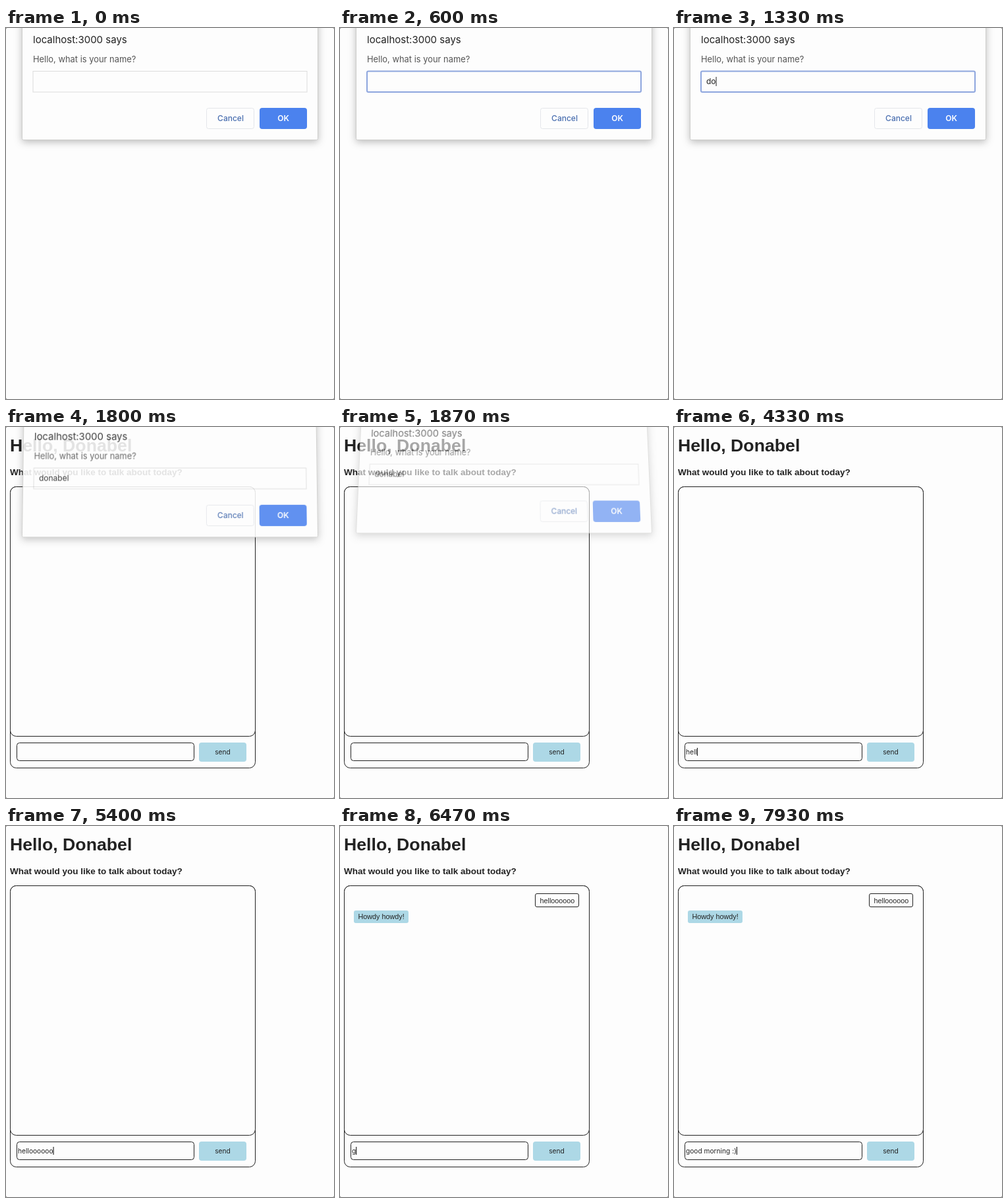
These frames come from a looping animation (498 px wide and 562 px high, 8 s). An HTML page:

```html
<!DOCTYPE html>
<html lang="en">
<head>
<meta charset="utf-8">
<title>Chat prompt</title>
<style>
  html, body { margin: 0; width: 100%; height: 100%; overflow: hidden; background: #777; }
  svg { position: absolute; left: 0; top: 0; }
  text { white-space: pre; fill: #222; font-family: "Liberation Sans", Arial, sans-serif; }
  .ui { font-family: Inter, sans-serif; }
  .line { fill: #fdfdfd; stroke: #222; }
  .tint { fill: #add8e6; }
  .mid { text-anchor: middle; }
  #dialog { overflow: visible; transform-origin: 249px 169px; }
  #sheet { fill: #fdfdfd; stroke: #cdcdcb; filter: drop-shadow(0 3px 6px rgba(0, 0, 0, .26)); }
  #dialog .button { font-size: 12px; font-weight: 500; }
</style>
</head>
<body>
<svg width="498" height="562">
  <rect width="498" height="562" rx="2" fill="#fdfdfd"/>
  <g id="page">
    <text x="6" y="37" font-size="26.7" font-weight="bold">Hello, Donabel</text>
    <text x="6" y="73" font-size="13.5" font-weight="bold">What would you like to talk about today?</text>
    <rect class="line" x="6.5" y="90.5" width="372" height="426" rx="9"/>
    <rect class="line" x="6.5" y="90.5" width="372" height="378" rx="9"/>
    <rect class="line" x="16.5" y="478.5" width="269" height="27" rx="4"/>
    <text id="message" class="ui" x="18" y="496" font-size="10.2"></text>
    <rect id="messageCaret" y="486" width="1" height="12"/>
    <rect class="tint" x="293" y="478" width="72" height="29" rx="4"/>
    <text class="ui mid" x="329" y="496" font-size="10.2">send</text>
    <g id="chat" font-size="10.8">
      <rect class="line" x="296.5" y="102.5" width="66" height="20" rx="2.5"/>
      <text x="303.5" y="117">helloooooo</text>
      <rect class="tint" x="21" y="128" width="83" height="19" rx="3"/>
      <text x="27.5" y="141">Howdy howdy!</text>
    </g>
  </g>
</svg>
<svg id="dialog" width="498" height="562">
  <rect id="sheet" x="24.5" y="-30" width="449" height="199.5" rx="2"/>
  <text class="ui" x="41" y="23" font-size="15">localhost:3000 says</text>
  <text class="ui" x="41" y="52" font-size="12.9" style="fill:#555">Hello, what is your name?</text>
  <rect id="field" x="41" y="65.5" width="416" height="31.5" fill="none"/>
  <text id="name" class="ui" x="49" y="85" font-size="12"></text>
  <rect id="nameCaret" y="74" width="1" height="14" fill="#222"/>
  <rect x="304.5" y="121.5" width="72" height="31" rx="3" fill="none" stroke="#e4e6ea"/>
  <text class="ui mid button" x="341" y="141" style="fill:#4a6fb0">Cancel</text>
  <rect x="385" y="121" width="72" height="32" rx="4" fill="#4b82ee"/>
  <text class="ui mid button" x="421" y="141" style="fill:#fff;font-weight:600">OK</text>
</svg>
<script>
const LOOP = 8000, FOCUS = 70, CLOSE = 1770, PAGE = 1795, GONE = 2000;
const MESSAGE_FOCUS = 3530, SEND = 5600;
const $ = id => document.getElementById(id);
const show = (node, on) => { node.style.display = on ? '' : 'none'; };

// Types text one key at a time; the caret stays solid while keys arrive, then blinks.
function type(id, text, t, focus, start, step) {
  const field = $(id), caret = $(id + 'Caret');
  const count = Math.max(0, Math.min(text.length, Math.floor((t - start) / step) + 1));
  const lastKey = count ? start + (count - 1) * step : focus;
  field.textContent = text.slice(0, count);
  caret.setAttribute('x', +field.getAttribute('x') + field.getComputedTextLength());
  show(caret, t >= focus && (t - lastKey) % 1000 < 500);
}

function drawDialog(t) {
  const dialog = $('dialog');
  show(dialog, t < GONE);
  if (t >= GONE) return;
  const p = Math.max(0, (t - CLOSE) / (GONE - CLOSE));
  const q = p / 0.43;
  dialog.style.opacity = 1 - 0.9 * p;
  dialog.style.transform = p
    ? `perspective(1000px) translateY(${-8.5 * q}px) scaleY(${1 + 0.05 * q}) rotateX(${11.5 * q}deg)`
    : 'none';
  type('name', 'donabel', t, FOCUS, 1260, 70);

  const focused = t >= FOCUS && t < CLOSE;
  const field = $('field');
  field.setAttribute('stroke', focused ? '#8ea6de' : '#dcdcdc');
  field.setAttribute('stroke-width', focused ? 2 : 1);
  field.setAttribute('rx', focused ? 2 : 0);
  if (!focused) show($('nameCaret'), false);
}

function drawPage(t) {
  show($('page'), t >= PAGE);
  show($('chat'), t >= SEND);
  if (t < PAGE) return;
  if (t < SEND) type('message', 'helloooooo', t, MESSAGE_FOCUS, 3930, 130);
  else type('message', 'good morning :)', t, SEND, 6465, 103);
}

function draw() {
  const t = performance.now() % LOOP;
  drawDialog(t);
  drawPage(t);
  requestAnimationFrame(draw);
}
draw();
</script>
</body>
</html>
```
